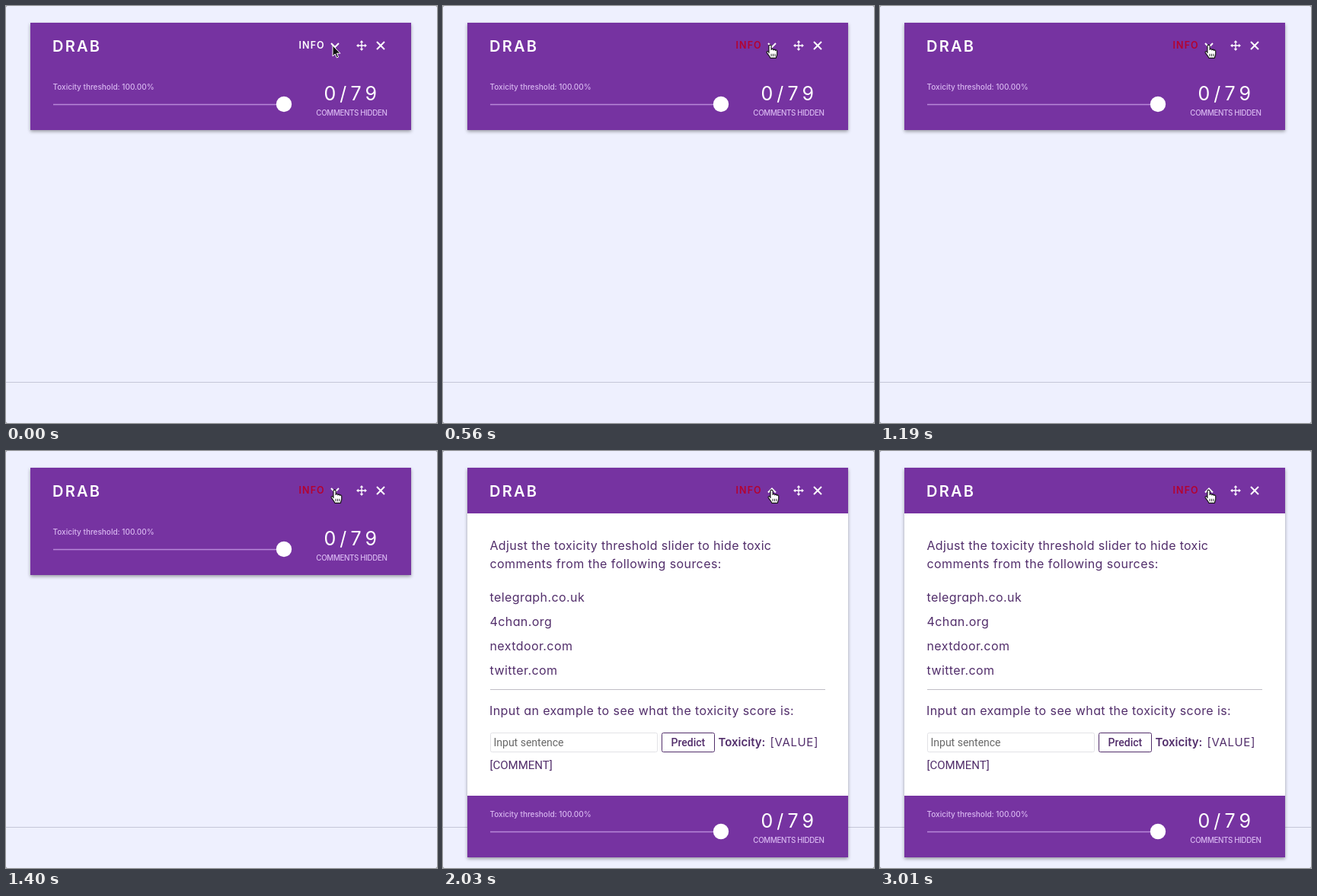
An HTML page that plays this animation: 566 px wide and 548 px high, repeating every 3.08 s.

```html
<!DOCTYPE html>
<html lang="en">
<head>
<meta charset="utf-8">
<title>Comment filter panel</title>
<style>
  html, body { margin: 0; width: 100%; height: 100%; overflow: hidden; background: #eef0fe; }
  svg { display: block; width: 566px; height: 548px; }
  text { font-family: Inter, "Open Sans", sans-serif; font-feature-settings: "cv11"; white-space: pre; }
  .roboto { font-family: Roboto, Arial, sans-serif; }
  .copy text { font-size: 16px; fill: #522e6b; letter-spacing: .41px; }
  .copy .small { font-size: 15px; letter-spacing: 0; }
  .copy .field { font-size: 14px; letter-spacing: 0; }
  .line { fill: none; stroke: #fff; stroke-width: 2; }
  .thin { stroke-width: 1.3; }
  .label { font-weight: 500; fill: #d9b8f1; }
  .shadow { filter: drop-shadow(0 2px 2px rgba(0, 0, 0, .36)); }
</style>
</head>
<body>
<svg viewBox="0 0 566 548">
  <rect width="566" height="548" fill="#85858c"/>
  <rect width="566" height="548" rx="2" fill="#eef0fe"/>
  <path d="M0 494.5H566" stroke="#c5c7d8"/>

  <rect id="card" class="shadow" x="32" y="22" width="500" height="141" fill="#7633a1"/>

  <text x="61" y="59.5" font-size="20" font-weight="600" letter-spacing="2.2" fill="#fff">DRAB</text>
  <text id="info" x="384.5" y="56.3" font-size="12.5" font-weight="600" letter-spacing="1.1">INFO</text>
  <path id="chevron" class="line"/>
  <path class="line thin" d="M461 52H473M467 46V58"/>
  <path fill="#fff" d="M467 45L469.3 48H464.7ZM467 59L469.3 56H464.7ZM460 52L463 49.7V54.3ZM474 52L471 49.7V54.3Z"/>
  <path class="line" d="M487 47L497 57M497 47L487 57"/>

  <g id="details" class="copy">
    <rect x="32" y="82" width="500" height="371" fill="#fff"/>
    <text x="61.5" y="130" style="letter-spacing:.33px">Adjust the toxicity threshold slider to hide toxic</text>
    <text x="61.5" y="154">comments from the following sources:</text>
    <text x="61.5" y="198">telegraph.co.uk</text>
    <text x="61.5" y="230">4chan.org</text>
    <text x="61.5" y="262">nextdoor.com</text>
    <text x="61.5" y="294">twitter.com</text>
    <path d="M62 313.5H502" stroke="#bfbdc5"/>
    <text x="61" y="347">Input an example to see what the toxicity score is:</text>
    <rect x="62.5" y="370.5" width="219" height="25" rx="2" fill="#fff" stroke="#e2e2e6"/>
    <text class="roboto field" x="66.5" y="388" style="fill:#686868">Input sentence</text>
    <rect x="287.5" y="370.5" width="69" height="25" rx="2" fill="#fff" stroke="#522e6b"/>
    <text class="roboto field" x="299.5" y="388" font-weight="500">Predict</text>
    <text class="small" x="361.5" y="388" font-weight="600">Toxicity:</text>
    <text class="small" x="429.5" y="388" style="letter-spacing:.6px">[VALUE]</text>
    <text class="roboto small" x="61.5" y="418">[COMMENT]</text>
  </g>

  <g id="footer">
    <text class="label" x="61.5" y="110" font-size="10">Toxicity threshold: 100.00%</text>
    <path d="M62 129.5H366" stroke="#b788d8" stroke-width="1.6"/>
    <circle cx="365" cy="129" r="10.2" fill="#fff"/>
    <text x="417.5" y="123.5" font-size="25" letter-spacing="5.1" fill="#fff">0/79</text>
    <text class="label" x="407.3" y="144.3" font-size="9.8" letter-spacing="-.35">COMMENTS HIDDEN</text>
  </g>

  <path id="arrow" transform="translate(429 52)" fill="#111" stroke="#fff"
    d="M0 0V14L3.2 11 5.4 16 7.6 15 5.4 10.2H10Z"/>
  <g id="hand" fill="#fff" stroke="#111" stroke-linejoin="round">
    <path d="M4 10V2a1.4 1.4 0 0 1 2.8 0v4.2c.4-1.3 2.4-1 2.5.4.5-1.1 2.2-.8 2.3.5.5-.9 2-.6 2 .8v3.2c0 2-.9 2.6-1.2 4.9H5.6c-.4-2-2.4-3.6-3.9-6.1-.9-1.6.7-2.6 2.3-.8z"/>
    <path stroke-width=".8" d="M6.8 11V14M9 11V14M11.2 11V14"/>
  </g>
</svg>
<script>
  const LOOP = 3080, TICK = 70, HOVER = 560, OPEN = 1470, DETAILS_HEIGHT = 371;
  const drift = [0, 1, 1.5, 2];
  const part = id => document.getElementById(id);
  const show = (id, on) => part(id).setAttribute('visibility', on ? 'visible' : 'hidden');

  function render(t) {
    const hover = t >= HOVER, open = t >= OPEN;
    const step = Math.max(0, Math.min(drift.length - 1, Math.floor((t - HOVER) / TICK)));
    const shift = open ? DETAILS_HEIGHT : 0;

    show('details', open);
    show('arrow', !hover);
    show('hand', hover);
    part('card').setAttribute('height', 141 + shift);
    part('footer').setAttribute('transform', `translate(0 ${shift})`);
    part('info').setAttribute('fill', hover ? '#b5022f' : '#fff');
    part('chevron').setAttribute('d', open ? 'M427 54.5L432 49.5 437 54.5' : 'M427 49L432 54 437 49');
    part('hand').setAttribute('transform', `translate(${423.5 + drift[step]} 50.5) scale(1.12)`);
  }

  const start = performance.now();
  function frame() {
    render((performance.now() - start) % LOOP);
    requestAnimationFrame(frame);
  }
  frame();
</script>
</body>
</html>
```
